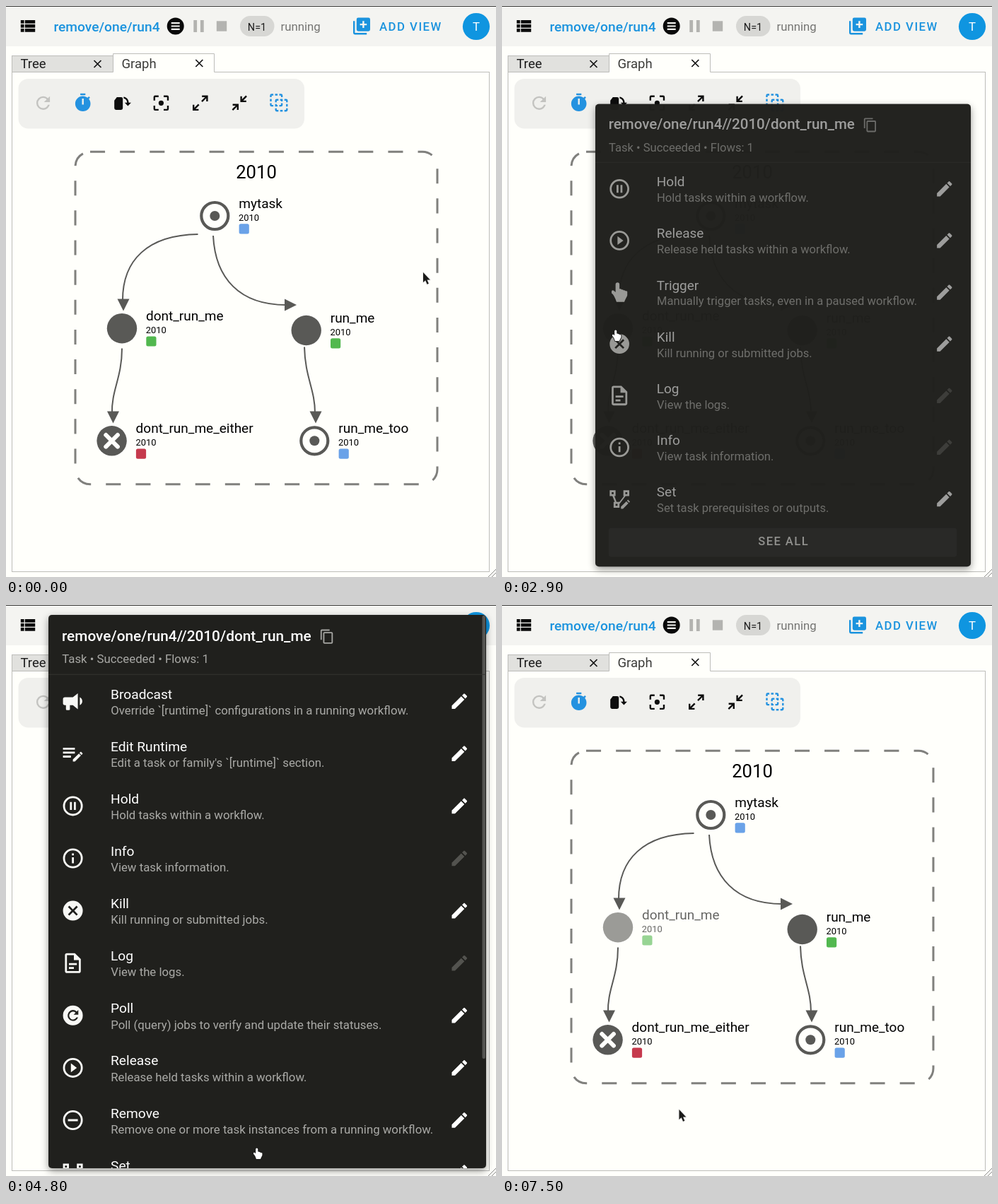
These frames come from a looping animation (693x808 px, 8 s). An HTML page with a canvas:

```html
<!DOCTYPE html>
<html lang="en">
<head>
<meta charset="utf-8">
<title>Workflow graph</title>
<style>
html, body { margin: 0; width: 100%; height: 100%; overflow: hidden; background: #fffffb; }
canvas { display: block; }
</style>
</head>
<body>
<canvas id="stage" width="693" height="808"></canvas>
<script>
const ctx = document.getElementById('stage').getContext('2d');
const LOOP = 8000, STEP = 100;
const PAGE = '#fffffb', BLUE = '#1b93de', NODE = '#595956', DARK = '#20201d';
// Text and icon sizes of the interface
const SMALL = 16.8, MEDIUM = 19.2, ICON = 28.8, BIG_ICON = 33.6;

// Icons on a 24-unit grid, filled with the even-odd rule
const DISC = 'M12 2A10 10 0 1 0 12 22A10 10 0 1 0 12 2Z';
const RING = DISC + 'M12 4A8 8 0 1 0 12 20A8 8 0 1 0 12 4Z';
const ICONS = {
  list: 'M9,5V9H21V5M9,19H21V15H9M9,14H21V10H9M4,9H8V5H4M4,19H8V15H4M4,14H8V10H4V14Z',
  menu: DISC + 'M7 7.4H17V9.2H7ZM7 11.1H17V12.9H7ZM7 14.8H17V16.6H7Z',
  pauseBars: 'M14,19H18V5H14M6,19H10V5H6V19Z',
  stop: 'M18,18H6V6H18V18Z',
  add: 'M18 11H15V14H13V11H10V9H13V6H15V9H18ZM20 2H8A2 2 0 0 0 6 4V16A2 2 0 0 0 8 18H20A2 2 0 0 0 22 16V4A2 2 0 0 0 20 2ZM4 6H2V20A2 2 0 0 0 4 22H18V20H4Z',
  refresh: 'M17.65,6.35C16.2,4.9 14.21,4 12,4A8,8 0 0,0 4,12A8,8 0 0,0 12,20C15.73,20 18.84,17.45 19.73,14H17.65C16.83,16.33 14.61,18 12,18A6,6 0 0,1 6,12A6,6 0 0,1 12,6C13.66,6 15.14,6.69 16.22,7.78L13,11H20V4L17.65,6.35Z',
  timer: 'M19.03 7.39L20.45 5.97C20 5.46 19.55 5 19.04 4.56L17.62 6C16.07 4.74 14.12 4 12 4C7.03 4 3 8.03 3 13S7.03 22 12 22C17 22 21 17.97 21 13C21 10.88 20.26 8.93 19.03 7.39M13 14H11V7H13V14M15 1H9V3H15V1Z',
  rotate: 'M6 5H11A2 2 0 0 1 13 7V18A2 2 0 0 1 11 20H5A2 2 0 0 1 3 18V9ZM14 4.6C17.6 5 20 7.9 20 11.5H22.8L19 15.6L15.2 11.5H18C18 9 16.4 7 14 6.6Z',
  focus: 'M12,9A3,3 0 0,0 9,12A3,3 0 0,0 12,15A3,3 0 0,0 15,12A3,3 0 0,0 12,9M19,19H15V21H19A2,2 0 0,0 21,19V15H19M19,3H15V5H19V9H21V5A2,2 0 0,0 19,3M5,5H9V3H5A2,2 0 0,0 3,5V9H5M5,15H3V19A2,2 0 0,0 5,21H9V19H5V15Z',
  expand: 'M10,21V19H6.41L10.91,14.5L9.5,13.09L5,17.59V14H3V21H10M14.5,10.91L19,6.41V10H21V3H14V5H17.59L13.09,9.5L14.5,10.91Z',
  collapse: 'M19.5,3.09L15,7.59V4H13V11H20V9H16.41L20.91,4.5L19.5,3.09M4,13V15H7.59L3.09,19.5L4.5,20.91L9,16.41V20H11V13H4Z',
  group: 'M3,1H5V3H3V5H1V3A2,2 0 0,1 3,1M14,1A2,2 0 0,1 16,3V5H14V3H12V1H14M20,7A2,2 0 0,1 22,9V11H20V9H18V7H20M22,20A2,2 0 0,1 20,22H18V20H20V18H22V20M20,13H22V16H20V13M13,9V7H16V10H14V9H13M13,22V20H16V22H13M9,22A2,2 0 0,1 7,20V18H9V20H11V22H9M7,16V13H9V14H10V16H7M7,3V1H10V3H7M3,16A2,2 0 0,1 1,14V12H3V14H5V16H3M1,7H3V10H1V7M9,7H11V9H9V11H7V9A2,2 0 0,1 9,7M16,14A2,2 0 0,1 14,16H12V14H14V12H16V14Z',
  hold: RING + 'M13,16V8H15V16ZM9,16V8H11V16Z',
  release: RING + 'M10,16.5L16,12L10,7.5Z',
  kill: DISC + 'M15.59,7L12,10.59L8.41,7L7,8.41L10.59,12L7,15.59L8.41,17L12,13.41L15.59,17L17,15.59L13.41,12L17,8.41Z',
  info: RING + 'M11,9H13V7H11ZM11,17H13V11H11Z',
  remove: RING + 'M7,11V13H17V11Z',
  poll: DISC + 'M12 6.5A5.5 5.5 0 1 0 17.3 14H15.6A3.9 3.9 0 1 1 14.7 9.2L12.7 11.2H17.5V6.5L15.9 8A5.5 5.5 0 0 0 12 6.5Z',
  hand: 'M10,2A2,2 0 0,1 12,4V8.5C12,8.5 14,8.25 14,9.25C14,9.25 16,9 16,10C16,10 18,9.75 18,10.75C18,10.75 20,10.5 20,11.5V15C20,16 17,21 17,22H9C9,22 7,15 4,13C4,13 3,7 8,12V4A2,2 0 0,1 10,2Z',
  log: 'M6,2A2,2 0 0,0 4,4V20A2,2 0 0,0 6,22H18A2,2 0 0,0 20,20V8L14,2H6M6,4H13V9H18V20H6V4M8,12V14H16V12H8M8,16V18H13V16H8Z',
  set: 'M2 3H8V9H2ZM4 5V7H6V5ZM16 3H22V9H16ZM18 5V7H20V5ZM6 15H12V21H6ZM8 17V19H10V17ZM4.8 9H6.8L9 15H7.2ZM12 15L16.6 9L18.2 9L12 17.2ZM13.5 22V19.9L19 14.4L21.1 16.5L15.6 22ZM19.7 13.7L20.7 12.7L22.8 14.8L21.8 15.8Z',
  pencil: 'M20.71,7.04C21.1,6.65 21.1,6 20.71,5.63L18.37,3.29C18,2.9 17.35,2.9 16.96,3.29L15.12,5.12L18.87,8.87M3,17.25V21H6.75L17.81,9.93L14.06,6.18L3,17.25Z',
  copy: 'M19,21H8V7H19M19,5H8A2,2 0 0,0 6,7V21A2,2 0 0,0 8,23H19A2,2 0 0,0 21,21V7A2,2 0 0,0 19,5M16,1H4A2,2 0 0,0 2,3V17H4V3H16V1Z',
  broadcast: 'M12,8H4A2,2 0 0,0 2,10V14A2,2 0 0,0 4,16H5V20A1,1 0 0,0 6,21H8A1,1 0 0,0 9,20V16H12L17,20V4L12,8M21.5,12C21.5,13.71 20.54,15.26 19,16V8C20.53,8.75 21.5,10.3 21.5,12Z',
  edit: 'M2,6V8H14V6H2M2,10V12H14V10H2M20.04,10.13C19.9,10.13 19.76,10.19 19.65,10.3L18.65,11.3L20.7,13.35L21.7,12.35C21.92,12.14 21.92,11.79 21.7,11.58L20.42,10.3C20.31,10.19 20.18,10.13 20.04,10.13M18.07,11.88L12,17.94V20H14.06L20.12,13.93L18.07,11.88M2,14V16H10V14H2Z'
};
const PATHS = {};
for (const name in ICONS) PATHS[name] = new Path2D(ICONS[name]);
const ARROW = new Path2D('M0 0V14L3.2 11.2L5.6 16.8L7.8 15.8L5.5 10.4H9.8Z');

// name: [icon, description, editable]
const ACTIONS = {
  'Broadcast': ['broadcast', 'Override `[runtime]` configurations in a running workflow.', 1],
  'Edit Runtime': ['edit', "Edit a task or family's `[runtime]` section.", 1],
  'Hold': ['hold', 'Hold tasks within a workflow.', 1],
  'Info': ['info', 'View task information.', 0],
  'Kill': ['kill', 'Kill running or submitted jobs.', 1],
  'Log': ['log', 'View the logs.', 0],
  'Poll': ['poll', 'Poll (query) jobs to verify and update their statuses.', 1],
  'Release': ['release', 'Release held tasks within a workflow.', 1],
  'Remove': ['remove', 'Remove one or more task instances from a running workflow.', 1],
  'Set': ['set', 'Set task prerequisites or outputs.', 1],
  'Trigger': ['hand', 'Manually trigger tasks, even in a paused workflow.', 1]
};
const SHORT = { x: 132, y: 134, w: 538, h: 663, pad: 0,
  rows: ['Hold', 'Release', 'Trigger', 'Kill', 'Log', 'Info', 'Set'] };
const FULL = { x: 60, y: 14, w: 619, h: 783, pad: .7, full: true,
  rows: Object.keys(ACTIONS).filter(n => n !== 'Trigger') };

// Pointer keys: time, x, y, shape (0 arrow, 1 hand)
const POINTER = [
  [0, 590, 377, 0], [100, 554, 380, 0], [300, 554, 380, 0], [400, 520, 386, 0],
  [700, 215, 446, 0], [800, 133, 461, 0], [900, 137, 463, 0], [1100, 137, 463, 0],
  [1200, 130, 463, 0], [1300, 130, 463, 0], [1400, 150, 459, 1], [1500, 150, 459, 1],
  [1600, 156, 458, 1], [3500, 156, 458, 1], [4000, 390, 690, 1], [4200, 429, 788, 1],
  [4400, 350, 768, 1], [4800, 350, 768, 1], [5300, 249, 714, 1], [5400, 247, 713, 1],
  [6200, 247, 713, 1], [6300, 250.5, 714, 0]
];

// CSS-style cubic bezier easing
function bezier(x1, y1, x2, y2) {
  const at = (a, b, s) => 3 * a * (1 - s) ** 2 * s + 3 * b * (1 - s) * s * s + s ** 3;
  return t => {
    if (t <= 0) return 0;
    if (t >= 1) return 1;
    let lo = 0, hi = 1;
    for (let i = 0; i < 30; i++) {
      const mid = (lo + hi) / 2;
      if (at(x1, x2, mid) < t) lo = mid; else hi = mid;
    }
    return at(y1, y2, lo);
  };
}
const decelerate = bezier(0, 0, .2, 1), accelerate = bezier(.4, 0, 1, 1), standard = bezier(.4, 0, .2, 1);
const clamp = v => Math.max(0, Math.min(1, v));

function text(str, x, y, size, color, weight = 400, align = 'left', spacing = 0) {
  ctx.font = `${weight} ${size}px Roboto, sans-serif`;
  ctx.fillStyle = color;
  ctx.textAlign = align;
  ctx.letterSpacing = spacing + 'px';
  ctx.fillText(str, x, y);
}
function icon(name, cx, cy, color, size = ICON) {
  ctx.save();
  ctx.translate(cx - size / 2, cy - size / 2);
  ctx.scale(size / 24, size / 24);
  ctx.fillStyle = color;
  ctx.fill(PATHS[name], 'evenodd');
  ctx.restore();
}
function box(x, y, w, h, r, color) {
  ctx.beginPath();
  ctx.roundRect(x, y, w, h, r);
  ctx.fillStyle = color;
  ctx.fill();
}
function disc(x, y, r, color) {
  ctx.beginPath();
  ctx.arc(x, y, r, 0, 7);
  ctx.fillStyle = color;
  ctx.fill();
}
function cross(x, y, r, width, color) {
  ctx.beginPath();
  ctx.moveTo(x - r, y - r); ctx.lineTo(x + r, y + r);
  ctx.moveTo(x + r, y - r); ctx.lineTo(x - r, y + r);
  ctx.lineWidth = width;
  ctx.strokeStyle = color;
  ctx.stroke();
}

function drawHeader() {
  box(0, 0, 693, 57, 0, '#f4f4f1');
  box(0, 0, 693, 1, 0, '#3a3a38');
  icon('list', 30.4, 28.4, '#0a0a0a');
  text('remove/one/run4', 67.5, 35.5, MEDIUM, BLUE, 500);
  icon('menu', 239.7, 28.5, '#0a0a0a');
  icon('pauseBars', 272.5, 28.5, '#b3b3b0');
  icon('stop', 305, 28.5, '#b3b3b0');
  box(331, 14, 48.5, 29, 14.5, '#d7d7d4');
  text('N=1', 355, 34.5, 14.4, '#1a1a1a', 400, 'center');
  text('running', 388.5, 34.5, SMALL, '#757573');
  icon('add', 503, 28.5, BLUE);
  text('ADD VIEW', 528, 35, SMALL, BLUE, 500, 'left', 1.45);
  disc(665, 29, 19.1, '#0f95e0');
  text('T', 665, 35, SMALL, '#fff', 400, 'center');
}

function drawPanel() {
  ctx.lineWidth = 1;
  ctx.strokeStyle = '#bdbdba';
  ctx.strokeRect(8.5, 93.5, 675, 707);
  ctx.fillStyle = '#e1e1de';
  ctx.fillRect(8.5, 70.5, 143, 23);
  ctx.strokeRect(8.5, 70.5, 143, 23);
  ctx.fillStyle = PAGE;
  ctx.fillRect(151.5, 67.5, 143, 27);
  ctx.beginPath();
  ctx.moveTo(151.5, 93.5); ctx.lineTo(151.5, 67.5); ctx.lineTo(294.5, 67.5); ctx.lineTo(294.5, 93.5);
  ctx.stroke();
  text('Tree', 20.5, 88, 18.5, '#1c1c1c');
  text('Graph', 163.5, 88, 18.5, '#3c3c3a');
  cross(129.5, 82, 5, 1.7, '#111');
  cross(273.3, 81, 5, 1.7, '#111');
  ctx.lineWidth = 1;
  ctx.strokeStyle = '#8a8a88';
  ctx.beginPath();
  ctx.moveTo(682, 808); ctx.lineTo(693, 797);
  ctx.moveTo(687, 808); ctx.lineTo(693, 802);
  ctx.stroke();

  box(17.5, 103, 404.5, 70.5, 14, '#f0f0ed');
  icon('refresh', 52.5, 137.3, '#c3c3c0');
  icon('timer', 108.7, 137, '#2492e0');
  ['rotate', 'focus', 'expand', 'collapse'].forEach((n, i) => icon(n, 164 + i * 55.4, 137.3, '#0d0d0d'));
  icon('group', 386.5, 137.5, '#2492e0');
}

function drawEdge(x, y, curve, hx, hy, angle) {
  ctx.strokeStyle = ctx.fillStyle = NODE;
  ctx.lineWidth = 2;
  ctx.beginPath();
  ctx.moveTo(x, y);
  ctx.bezierCurveTo(...curve);
  ctx.stroke();
  ctx.save();
  ctx.translate(hx, hy);
  ctx.rotate(angle);
  ctx.beginPath();
  ctx.moveTo(0, 0); ctx.lineTo(-8.5, -17); ctx.lineTo(8.5, -17);
  ctx.fill();
  ctx.restore();
}

function drawNode(x, y, name, kind, color, alpha = 1) {
  ctx.save();
  ctx.globalAlpha = alpha;
  if (kind === 'running') {
    ctx.beginPath();
    ctx.arc(x, y, 19, 0, 7);
    ctx.lineWidth = 4.2;
    ctx.strokeStyle = NODE;
    ctx.stroke();
    disc(x, y, 7, NODE);
  } else {
    disc(x, y, 21.2, NODE);
    ctx.lineCap = 'round';
    if (kind === 'failed') cross(x, y, 8.3, 6, PAGE);
  }
  text(name, x + 34, y - 11, 19, '#000');
  text('2010', x + 33.8, y + 7, 12.9, '#000');
  box(x + 34.3, y + 11.2, 14.2, 14.2, 2.5, color);
  ctx.restore();
}

function drawGraph(fadeAlpha) {
  const l = 98, t = 206.3, r = 610, b = 676.7, rad = 21;
  ctx.save();
  ctx.beginPath();
  ctx.moveTo(l + rad, t);
  ctx.arcTo(r, t, r, b, rad);
  ctx.arcTo(r, b, l, b, rad);
  ctx.arcTo(l, b, l, t, rad);
  ctx.arcTo(l, t, r, t, rad);
  ctx.setLineDash([21.07, 21.07]);
  ctx.lineWidth = 3;
  ctx.strokeStyle = '#80807d';
  ctx.stroke();
  ctx.restore();
  text('2010', 354, 244, 25.6, '#000', 400, 'center');
  drawEdge(271.5, 323, [200, 324, 165, 360, 165, 416], 166, 431.5, 0);
  drawEdge(293, 325, [296, 386, 331, 423, 396, 423], 411, 423, -Math.PI / 2);
  drawEdge(164, 484.5, [164, 526, 149, 544, 150, 576], 151.5, 590.5, 0);
  drawEdge(422, 482.5, [423, 526, 437, 542, 437, 576], 438, 590.5, 0);
  const blue = '#6aa2e8', green = '#52b84f';
  drawNode(295.3, 297, 'mytask', 'running', blue);
  drawNode(164, 456.2, 'dont_run_me', 'done', green, fadeAlpha);
  drawNode(424.7, 459, 'run_me', 'done', green);
  drawNode(149.6, 615.3, 'dont_run_me_either', 'failed', '#c63a4d');
  drawNode(436.3, 615.3, 'run_me_too', 'running', blue);
}

function drawButton(m, hover, ripple) {
  box(19, 607.7, m.w - 39, 41.3, 4, hover ? '#40403d' : '#30302d');
  if (ripple) {
    ctx.save();
    ctx.clip();
    disc(253.5, 630, 196, '#70706c');
    ctx.restore();
  }
  text('SEE ALL', m.w / 2 + .7, 632.6, SMALL, '#e4e4e1', 500, 'center', 1.45);
}

function drawMenu(m, { ox = 0, oy = 0, scale = 1, alpha = 1, content = 1, hover, ripple, active }) {
  ctx.save();
  ctx.translate(ox, oy);
  ctx.scale(scale, scale);
  ctx.translate(m.x - ox, m.y - oy);
  ctx.globalAlpha = alpha;
  ctx.save();
  ctx.beginPath();
  // Keep the shadow outside so it never shows through the sheet
  ctx.rect(-200, -200, 1200, 1300);
  ctx.roundRect(0, 0, m.w, m.h, 5);
  ctx.clip('evenodd');
  ctx.shadowColor = 'rgba(0,0,0,.4)';
  ctx.shadowBlur = 11;
  ctx.shadowOffsetY = 4;
  box(0, 0, m.w, m.h, 5, DARK);
  ctx.restore();
  box(0, 0, m.w, m.h, 5, DARK);
  ctx.clip();
  if (active) box(7, 677, 580, 75, 5, 'rgba(255,255,255,.06)');
  if (m.full) box(m.w - 5.5, 1, 4.5, 627, 2, '#555552');

  ctx.globalAlpha = alpha * content;
  ctx.translate(0, m.pad);
  text('remove/one/run4//2010/dont_run_me', 19, 36, 20.8, '#fff', 500);
  icon('copy', 394, 30, '#a6a6a3', 22);
  text('Task • Succeeded • Flows: 1', 19.2, 67.7, SMALL, '#a8a8a5');
  box(0, 83, m.w, 1, 0, '#343431');
  m.rows.forEach((name, i) => {
    const [glyph, note, editable] = ACTIONS[name], y = 121.5 + i * 74.1;
    icon(glyph, 34.6, y, '#f8f8f5', BIG_ICON);
    text(name, 88, y - 3.5, MEDIUM, '#fff');
    text(note, 88.2, y + 18.7, SMALL, '#aaaaa7');
    icon('pencil', m.w - 37.7, y, editable ? '#fff' : '#53534f');
  });
  if (!m.full) drawButton(m, hover, ripple);
  ctx.restore();
}

function drawOverlay(t) {
  if (t >= 2700 && t < 4700) {
    const start = 2674, p = decelerate((t - start) / 269);
    const fade = standard((t - start) / 500);
    drawMenu(SHORT, {
      ox: 132, oy: 507, scale: .08 + .92 * p, alpha: p,
      content: clamp((fade - .33) / .67), hover: t >= 4500, ripple: t >= 4600
    });
  } else if (t >= 4700 && t < 6400) {
    const start = 6230, p = accelerate((t - start) / 160);
    const fade = standard((t - start) / 320);
    drawMenu(FULL, {
      ox: 140, oy: 512, scale: 1 - .95 * p, alpha: 1 - p,
      content: clamp(1 - fade / .2), active: t >= 5000
    });
  }
}

function drawPointer(t) {
  let i = POINTER.length - 1;
  while (POINTER[i][0] > t) i--;
  const a = POINTER[i], b = POINTER[i + 1] || a;
  const k = b === a ? 0 : (t - a[0]) / (b[0] - a[0]);
  const x = a[1] + (b[1] - a[1]) * k, y = a[2] + (b[2] - a[2]) * k;
  ctx.save();
  ctx.lineJoin = 'round';
  if (a[3]) {
    ctx.translate(x - 3, y - 1);
    ctx.scale(.77, .77);
    ctx.lineWidth = 2.4;
    ctx.strokeStyle = '#1c1c1a';
    ctx.stroke(PATHS.hand);
    ctx.fillStyle = '#fff';
    ctx.fill(PATHS.hand);
  } else {
    ctx.translate(x, y);
    ctx.lineWidth = 1.6;
    ctx.strokeStyle = '#e6e6e3';
    ctx.stroke(ARROW);
    ctx.fillStyle = '#1a1a18';
    ctx.fill(ARROW);
  }
  ctx.restore();
}

function frame(now) {
  const t = Math.floor((now % LOOP) / STEP) * STEP;
  ctx.fillStyle = PAGE;
  ctx.fillRect(0, 0, 693, 808);
  drawHeader();
  drawPanel();
  drawGraph(t >= 7500 ? .6 : 1);
  drawOverlay(t);
  drawPointer(t);
}

let origin;
function tick(now) {
  origin ??= now;
  frame(Math.max(0, now - origin));
  requestAnimationFrame(tick);
}
frame(0);
requestAnimationFrame(tick);
</script>
</body>
</html>
```
